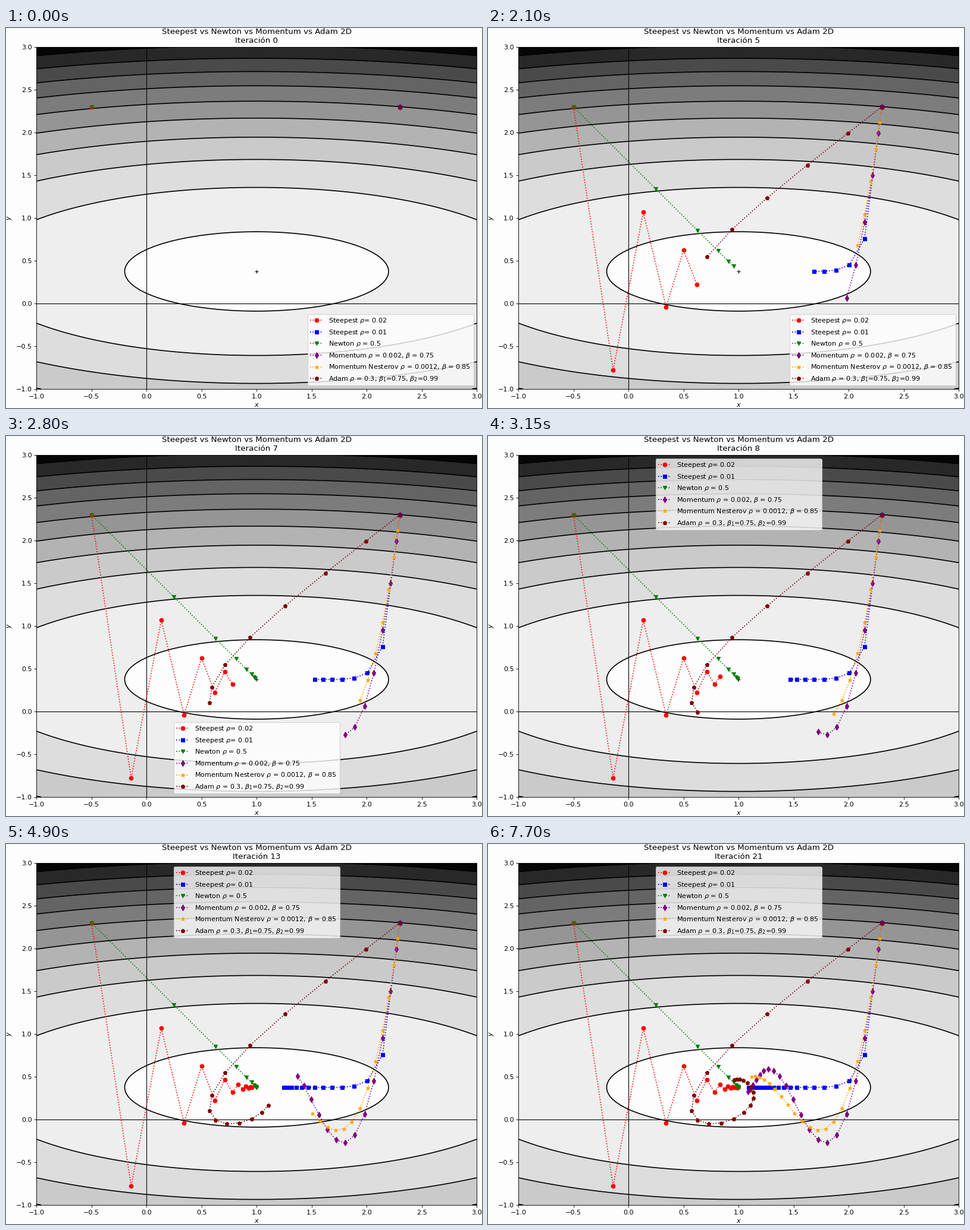
Write a matplotlib script that moves like this. It is 800 px wide and 640 px high and loops after 8000 ms.

```python
import numpy as np
import matplotlib as mpl
import matplotlib.pyplot as plt
from matplotlib.animation import FuncAnimation

TICK = 50                 # ms per animation frame
LOOP = 8000
STEP = 350                # ms per iteration; iteration 0 lasts twice as long
ITERS = 21
PAPER = "#fdfdfd"

CENTER = np.array([1.0, 0.375])
HESS = np.array([12.0, 80.0])
LEFT_START = (-0.5, 2.3)
RIGHT_START = (2.3, 2.3)


def f(x, y):
    return 6 * x**2 + 40 * y**2 - 12 * x - 30 * y + 3


def grad(p):
    return HESS * (p - CENTER)


def trace(start, move):
    """Apply move(p, state) repeatedly and return all visited points."""
    p, state = np.array(start), {}
    points = [p]
    for _ in range(ITERS):
        p = p - move(p, state)
        points.append(p)
    return np.array(points)


def steepest(rho):
    return lambda p, s: rho * grad(p)


def newton(rho):
    return lambda p, s: rho * grad(p) / HESS


def momentum(rho, beta, nesterov=False):
    def move(p, s):
        drift = beta * s.get("v", 0.0)
        s["v"] = drift + rho * grad(p - drift if nesterov else p)
        return s["v"]
    return move


def adam(rho, beta):
    def move(p, s):
        g = grad(p)
        s["m"] = beta * s.get("m", 0.0) + g
        s["v"] = s.get("v", 0.0) + g**2
        return rho * s["m"] / np.sqrt(s["v"])
    return move


RUNS = [
    (r"Steepest $\rho$= 0.02", "red", "o", LEFT_START, steepest(0.02)),
    (r"Steepest $\rho$= 0.01", "blue", "s", RIGHT_START, steepest(0.01)),
    (r"Newton $\rho$ = 0.5", "green", "v", LEFT_START, newton(0.5)),
    (r"Momentum $\rho$ = 0.002, $\beta$ = 0.75", "purple", "d",
     RIGHT_START, momentum(0.002, 0.75)),
    (r"Momentum Nesterov $\rho$ = 0.0012, $\beta$ = 0.85", "orange", "*",
     RIGHT_START, momentum(0.0012, 0.85, nesterov=True)),
    (r"Adam $\rho$ = 0.3, $\beta_1$=0.75, $\beta_2$=0.99", "maroon", "p",
     RIGHT_START, adam(0.306, 0.75)),
]

fig, ax = plt.subplots(figsize=(10, 8), dpi=80, facecolor=PAPER)
fig.subplots_adjust(left=0.064, right=0.989, bottom=0.05, top=0.95)

# Filled level curves, light in the valley and dark at the top
X, Y = np.meshgrid(np.linspace(-1, 3, 121), np.linspace(-1, 3, 121))
Z = f(X, Y)
levels = np.arange(-30, 301, 30)
bands = len(levels) - 1
shades = [mpl.colormaps["Greys"]((i + 0.5) / bands) for i in range(bands)]
shades[0], shades[-1] = PAPER, "#060606"
ax.contourf(X, Y, Z, levels=levels, colors=shades)
ax.contour(X, Y, Z, levels=levels, colors="black", linestyles="solid",
           linewidths=1.5)

ax.axhline(0, color="black", lw=1)
ax.axvline(0, color="black", lw=1)
ax.plot(*CENTER, "k+")

paths = [trace(start, move) for *_, start, move in RUNS]
lines = [ax.plot([], [], color=color, marker=marker, ls=":", label=label)[0]
         for label, color, marker, *_ in RUNS]

ax.set(xlim=(-1, 3), ylim=(-1, 3), xlabel="$x$", ylabel="$y$",
       xticks=np.arange(-1, 3.1, 0.5), yticks=np.arange(-1, 3.1, 0.5))
title = ax.set_title("")
legend = ax.legend(loc="lower right")


def legend_place(k):
    if k < 6:
        return "lower right"
    return "lower center" if k < 8 else "upper center"


def update(frame):
    k = min(max(frame * TICK // STEP - 1, 0), ITERS)
    for line, path in zip(lines, paths):
        line.set_data(path[:k + 1, 0], path[:k + 1, 1])
    title.set_text(f"Steepest vs Newton vs Momentum vs Adam 2D\nIteración {k}")
    legend.set_loc(legend_place(k))
    return [*lines, title, legend]


anim = FuncAnimation(fig, update, frames=LOOP // TICK, interval=TICK,
                     init_func=lambda: update(0), repeat=True, repeat_delay=0)
plt.show()
```
